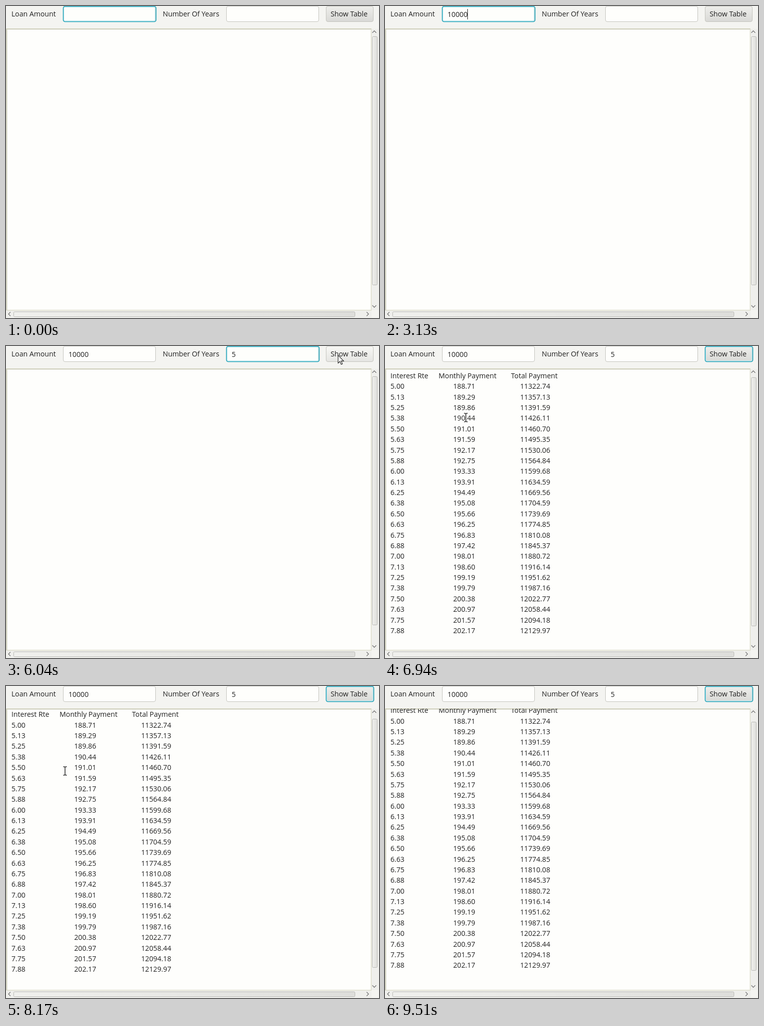
An HTML page for the animation above (9.55 s loop, 752 by 628 pixels).

```html
<!DOCTYPE html>
<html lang="en">
<head>
<meta charset="utf-8">
<title>Loan table</title>
<style>
  html, body { margin: 0; width: 100%; height: 100%; overflow: hidden; background: #f4f4f1; }
  svg { display: block; width: 752px; height: 628px; }
  text { font: 14.2px "Open Sans", "Noto Sans", sans-serif; fill: #202020; white-space: pre; }
  .chev { fill: none; stroke: #777; stroke-width: 1.3; }
  .thumb { fill: url(#thumb); stroke: #b9b9b5; }
</style>
</head>
<body>
<svg id="stage" viewBox="0 0 752 628">
  <defs>
    <linearGradient id="btn" x2="0" y2="1">
      <stop offset="0" stop-color="#eeeeeb"/><stop offset="1" stop-color="#d9d9d6"/>
    </linearGradient>
    <linearGradient id="hover" x2="0" y2="1">
      <stop offset="0" stop-color="#f8f8f5"/><stop offset="1" stop-color="#e5e5e2"/>
    </linearGradient>
    <linearGradient id="press" x2="0" y2="1">
      <stop offset="0" stop-color="#d4d4d1"/><stop offset="1" stop-color="#c9c9c6"/>
    </linearGradient>
    <linearGradient id="thumb">
      <stop offset="0" stop-color="#f0f0ed"/><stop offset="1" stop-color="#dededb"/>
    </linearGradient>
    <clipPath id="view"><rect x="2" y="46" width="733" height="565"/></clipPath>
  </defs>
</svg>
<script>
const LOOP = 9550;
const stage = document.getElementById('stage');

function add(name, attrs, text, parent = stage) {
  const node = document.createElementNS('http://www.w3.org/2000/svg', name);
  set(node, attrs);
  if (text) node.textContent = text;
  parent.appendChild(node);
  return node;
}
function set(node, attrs) {
  for (const key in attrs) node.setAttribute(key, attrs[key]);
}
const label = (x, y, text, parent) => add('text', { x, y }, text, parent);
const box = (x, y, width, height, attrs) => add('rect', { x, y, width, height, ...attrs });
const show = (node, on) => node.setAttribute('visibility', on ? 'visible' : 'hidden');

// Rounded control with a plain edge and a focus ring.
function control(x, width, fill) {
  const face = box(x + .5, .5, width - 1, 31, { rx: 3.5, fill, stroke: '#c4c4be' });
  const ring = add('g', {});
  ring.append(
    box(x + 1.5, 2, width - 3, 28, { rx: 2.5, fill: 'none', stroke: '#c9ecf2', 'stroke-width': 1.5 }),
    box(x + .5, .7, width, 30.8, { rx: 3.5, fill: 'none', stroke: '#22a3b8', 'stroke-width': 1.6 })
  );
  return { face, ring };
}

// Toolbar
box(0, 0, 752, 628, { fill: '#f4f4f1' });
label(11, 21, 'Loan Amount');
label(316, 21, 'Number Of Years');
const amount = control(115, 187, '#fefefc');
const years = control(444, 187, '#fefefc');
const button = control(645, 96, 'url(#btn)');
label(654.5, 21, 'Show Table');
const amountText = label(126, 22, '');
const yearsText = label(455, 22, '');
const caret = box(0, 6, 1, 21, { fill: '#222' });

// Text area
box(0, 45, 737, 568, { fill: '#dcdcc8' });
box(1, 46, 735, 566, { fill: '#c4c4b4' });
box(2, 47, 734, 565, { fill: '#fefefc' });
add('path', { d: 'M2 47.5H736M2.5 47V612M2 611.5H736M735.5 47V612', fill: 'none', stroke: '#f0f0e8' });

// Scroll bars
box(737, 46, 14, 566, { fill: '#efefec' });
box(1, 613, 736, 14, { fill: '#efefec' });
const thumb = box(738.5, 61.5, 10, 500, { rx: 2, class: 'thumb' });
box(15.5, 615.5, 688, 10, { rx: 2, class: 'thumb' });
for (const d of ['M738.5 54l4-4 4 4', 'M738.5 602.5l4 4 4-4', 'M9 616l-4 4 4 4', 'M727 616l4 4-4 4'])
  add('path', { d, class: 'chev' });

// Amortisation rows
const table = add('g', {}, '', add('g', { 'clip-path': 'url(#view)' }));
const rows = [];
function addRow(cells, xs) {
  rows.push(cells.map((cell, i) => label(xs[i], 0, cell, table)));
}
addRow(['Interest Rte', 'Monthly Payment', 'Total Payment'], [11, 108, 254]);
for (let rate = 5; rate < 8; rate += 1 / 8) {
  const m = rate / 1200;
  const pay = 10000 * m / (1 - (1 + m) ** -60);
  addRow([rate, pay, pay * 60].map(v => v.toFixed(2)), [11, 137.5, 272.5]);
}

// Mouse pointers, anchored at their hot spots
const beam = add('g', {});
const beamPath = 'M-3.5-8.5H-1.5L0-7.5 1.5-8.5H3.5M-3.5 8.5H-1.5L0 7.5 1.5 8.5H3.5M0-7.5V7.5';
add('path', { d: beamPath, fill: 'none', stroke: '#fefefc', 'stroke-width': 3 }, '', beam);
add('path', { d: beamPath, fill: 'none', stroke: '#1c1c1c', 'stroke-width': 1.4 }, '', beam);
const arrow = add('path', {
  d: 'M.5.5V16.5L4.2 13 6.8 19 9.3 18 6.7 12.1H11.8Z',
  fill: '#fefefc', stroke: '#222', 'stroke-width': 1.1
});

// Keys: time, then values
const mouse = [
  [900, 205, 69], [3000, 205, 69], [4400, 505, 66], [4700, 520, 20], [5350, 520, 20],
  [5950, 669, 18], [6450, 669, 18], [7000, 146, 148], [7400, 140, 154],
  [8170, 118.5, 171], [8600, 118.5, 171]
];
const scroll = [[6700, 0], [7400, 10.6], [8170, 5.6], [9510, 13.6]];

function track(keys, t) {
  const last = keys[keys.length - 1];
  if (t <= keys[0][0]) return keys[0].slice(1);
  if (t >= last[0]) return last.slice(1);
  const i = keys.findIndex(k => k[0] > t);
  const a = keys[i - 1], b = keys[i];
  const u = (t - a[0]) / (b[0] - a[0]);
  const e = u * u * (3 - 2 * u);
  return a.slice(1).map((v, j) => v + (b[j + 1] - v) * e);
}
const typed = (word, times, t) => word.slice(0, times.filter(at => t >= at).length);

function render(t) {
  const first = typed('10000', [1550, 1850, 2200, 2450, 2700], t);
  const second = typed('5', [5200], t);
  amountText.textContent = first;
  yearsText.textContent = second;

  const focus = t < 4700 ? amount : t < 6250 ? years : button;
  for (const c of [amount, years, button]) show(c.ring, c === focus);
  const blink = focus === amount ? t > 900 && (t + 50) % 1000 < 600 : (t - 4700) % 1000 < 500 && t < 6000;
  show(caret, focus !== button && blink);
  caret.setAttribute('x', focus === amount
    ? Math.round(125.6 + first.length * 8.12)
    : Math.round(454.6 + second.length * 8.12));

  const [mx, my] = track(mouse, t);
  const over = mx > 645 && mx < 741 && my < 32 && t < 7000;
  const held = t >= 6250 && t < 6380;
  button.face.setAttribute('fill', `url(#${held ? 'press' : over ? 'hover' : 'btn'})`);

  const [top] = track(scroll, t);
  show(table, t >= 6380);
  rows.forEach((cells, i) => {
    const y = Math.round(67.9 - top + i * 21.375);
    for (const cell of cells) cell.setAttribute('y', y);
  });
  thumb.setAttribute('y', Math.round(61 + top * .83) + .5);

  const visible = t >= 900 && t < 3000 || t >= 4400 && t < 8600;
  const inField = my < 32 && (mx > 115 && mx < 302 || mx > 444 && mx < 631);
  const overText = inField || my > 46 && mx < 736;
  show(beam, visible && overText);
  show(arrow, visible && !overText);
  const at = `translate(${Math.round(mx)} ${Math.round(my)})`;
  set(beam, { transform: at });
  set(arrow, { transform: at });
}

const start = performance.now();
function tick() {
  render((performance.now() - start) % LOOP);
  requestAnimationFrame(tick);
}
tick();
</script>
</body>
</html>
```
